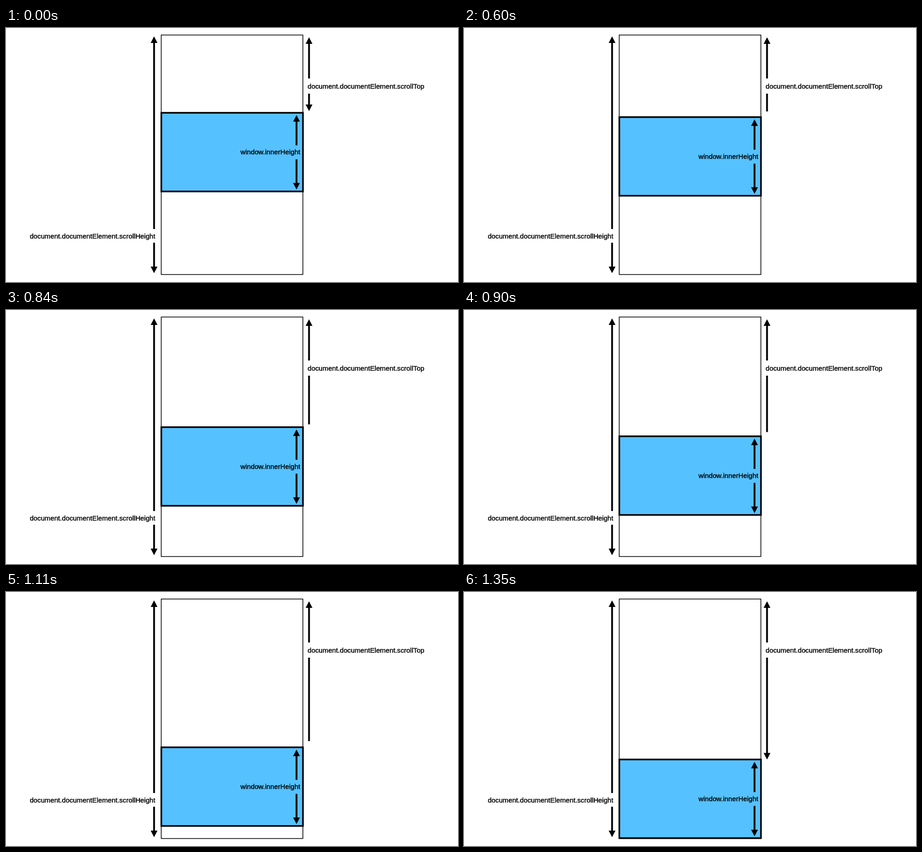
An HTML page for the animation above (1830 ms loop, 997 by 561 pixels).

```html
<!DOCTYPE html>
<html lang="en">
<head>
<meta charset="utf-8">
<title>Scroll metrics</title>
<style>
  html, body { margin: 0; height: 100%; overflow: hidden; background: #fff; }
  svg { display: block; width: 100%; height: 100%; }
  text {
    font: 15.2px "Liberation Sans", Arial, sans-serif;
    stroke: #000;
    stroke-width: .45px;
  }
</style>
</head>
<body>
<svg viewBox="0 0 997 561">
  <defs>
    <clipPath id="wipe"><rect id="wipeArea" x="650" y="140" width="40" height="0"/></clipPath>
  </defs>

  <rect x="342.4" y="15.5" width="312.4" height="529" fill="none" stroke="#000" stroke-width="1.6"/>

  <path class="arrow" data-x="326.6" data-tail="444" data-tip="18.5"/>
  <path class="arrow" data-x="326.6" data-tail="474.3" data-tip="541.5"/>
  <text x="52.4" y="464.5">document.documentElement.scrollHeight</text>

  <path class="arrow" data-x="668.4" data-tail="111.5" data-tip="20.5"/>
  <path class="arrow" data-x="668.4" data-tail="145" data-tip="183.5" id="shortArrow"/>
  <path class="arrow" data-x="668.4" data-tail="145" data-tip="370" clip-path="url(#wipe)"/>
  <text x="665.3" y="133.8">document.documentElement.scrollTop</text>

  <g id="viewport">
    <rect x="342.6" y="0" width="312.4" height="173.7" fill="#56c1ff" stroke="#000" stroke-width="3.6"/>
    <path class="arrow" data-x="640.8" data-tail="72" data-tip="5"/>
    <path class="arrow" data-x="640.8" data-tail="102.7" data-tip="169.5"/>
    <text x="517.2" y="92">window.innerHeight</text>
  </g>
</svg>
<script>
  const LOOP = 1830, STEP = 30;
  const SCROLL = { start: 476, duration: 846, from: 187.3, to: 369.9 };
  const WIPE = { start: 462, from: 145, speed: 0.2844, to: 372 };
  const HEAD = { length: 14.5, halfWidth: 7.5 };
  const SHAFT = 2;

  const byId = id => document.getElementById(id);
  const viewport = byId("viewport");
  const shortArrow = byId("shortArrow");
  const wipeArea = byId("wipeArea");

  // Vertical arrow: a flat-ended shaft and a triangular head.
  for (const arrow of document.querySelectorAll(".arrow")) {
    const [x, tail, tip] = [arrow.dataset.x, arrow.dataset.tail, arrow.dataset.tip].map(Number);
    const neck = tip - Math.sign(tip - tail) * HEAD.length;
    arrow.setAttribute("d",
      `M${x - SHAFT} ${tail}V${neck}H${x - HEAD.halfWidth}L${x} ${tip}` +
      `L${x + HEAD.halfWidth} ${neck}H${x + SHAFT}V${tail}Z`);
  }

  function easeInOut(p) {
    const clamped = Math.min(1, Math.max(0, p));
    return (1 - Math.cos(Math.PI * clamped)) / 2;
  }

  function draw(now) {
    const time = Math.floor(now % LOOP / STEP) * STEP;
    const moving = time >= 480;

    const progress = moving ? easeInOut((time - SCROLL.start) / SCROLL.duration) : 0;
    const top = SCROLL.from + (SCROLL.to - SCROLL.from) * progress;
    viewport.setAttribute("transform", `translate(0 ${top})`);

    const edge = Math.min(WIPE.to, WIPE.from + (time - WIPE.start) * WIPE.speed);
    shortArrow.style.display = moving ? "none" : "";
    wipeArea.setAttribute("height", moving ? edge - 140 : 0);
  }

  const startTime = performance.now();
  function tick() {
    draw(performance.now() - startTime);
    requestAnimationFrame(tick);
  }
  tick();
</script>
</body>
</html>
```
